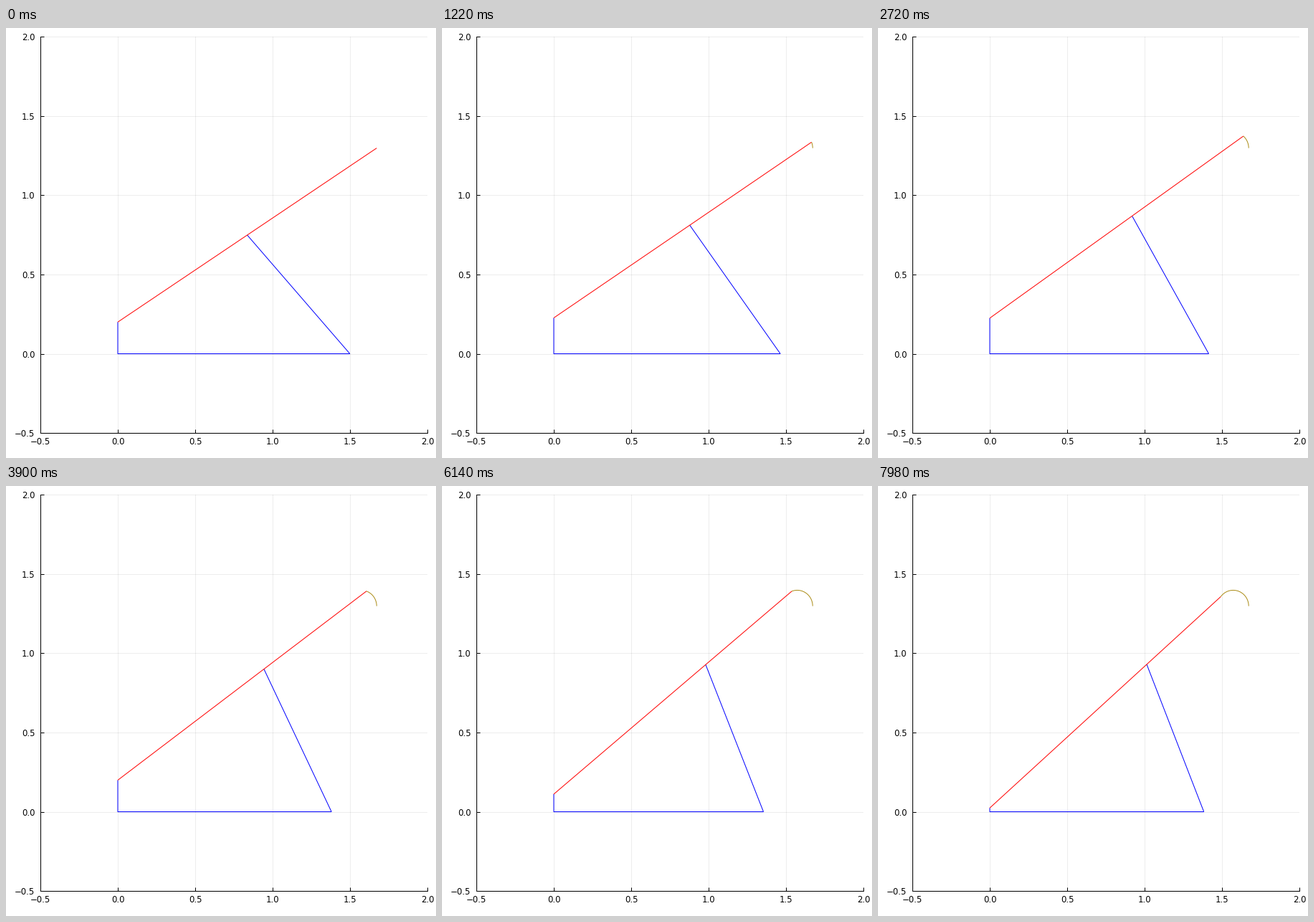
A matplotlib script that plays this animation: 600x600 px, repeating every 8 s.

```python
import matplotlib.pyplot as plt
import numpy as np
from matplotlib.animation import FuncAnimation

SIZE, DPI = 600, 100
FRAMES, INTERVAL = 400, 20
LEFT, RIGHT, TOP, BOTTOM = 48, 588, 12, 565.2
PX = 72 / DPI

plt.rcParams["font.family"] = "DejaVu Sans"

CENTER = np.array([2 * np.cos(np.arcsin(0.5485)) - 0.1, 1.297])
RADIUS = 0.1
ROD, STRUT = 2.0, 1.0
TURN = 2 * np.pi / 1000
SLIDE = 0.0009

fig = plt.figure(figsize=(SIZE / DPI, SIZE / DPI), dpi=DPI, facecolor="white")
ax = fig.add_axes([LEFT / SIZE, 1 - BOTTOM / SIZE,
                   (RIGHT - LEFT) / SIZE, (BOTTOM - TOP) / SIZE])
ax.set(xlim=(-0.5, 2), ylim=(-0.5, 2))
ticks = np.arange(-0.5, 2.01, 0.5)
ax.set_xticks(ticks)
ax.set_yticks(ticks)
ax.xaxis.set_major_formatter("{x:.1f}")
ax.yaxis.set_major_formatter("{x:.1f}")
ax.tick_params(direction="in", length=5 * PX, width=PX, labelsize=8.4)
ax.tick_params(axis="x", pad=5.5 * PX)
ax.tick_params(axis="y", pad=7.5 * PX)
ax.spines[["top", "right"]].set_visible(False)
ax.spines[["left", "bottom"]].set_linewidth(PX)
ax.set_axisbelow(True)
ax.grid(color="black", alpha=0.07, linewidth=PX)


def line(color):
    return ax.plot([], [], color=color, linewidth=PX, snap=False,
                   solid_capstyle="butt", clip_on=False)[0]


frame_line, strut_line = line("#0000ff"), line("#0000ff")
rod_line = line("#ff0000")
trace_line = line("#ac8d18")


def tip_at(n):
    a = TURN * np.asarray(n)
    return CENTER[0] + RADIUS * np.cos(a), CENTER[1] + RADIUS * np.sin(a)


def update(n):
    tx, ty = tip_at(n)
    post = ty - np.sqrt(ROD**2 - tx**2)
    # the strut's joint slides along the rod at constant speed
    part = (1 + SLIDE * n) / ROD
    jx, jy = part * tx, post + part * (ty - post)
    foot = jx + np.sqrt(STRUT**2 - jy**2)

    frame_line.set_data([0, 0, foot], [post, 0, 0])
    strut_line.set_data([foot, jx], [0, jy])
    rod_line.set_data([0, tx], [post, ty])
    trace_line.set_data(*tip_at(np.arange(n + 1)))
    return frame_line, strut_line, rod_line, trace_line


anim = FuncAnimation(fig, update, frames=FRAMES, interval=INTERVAL,
                     repeat=True, repeat_delay=0, blit=False)
plt.show()
```
